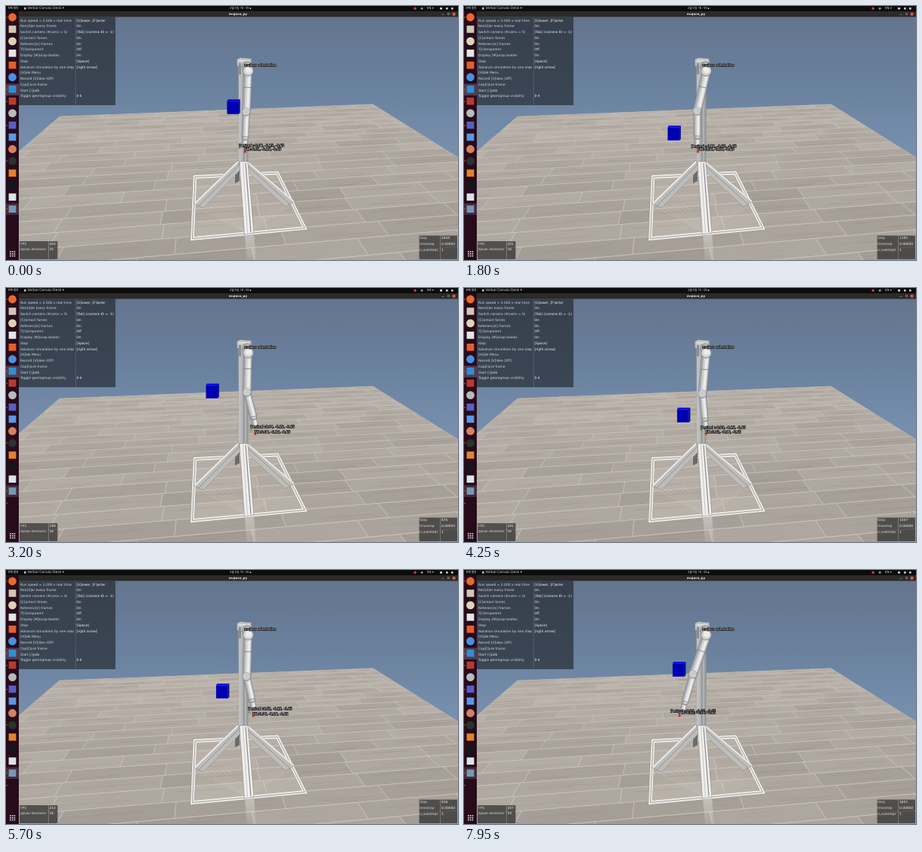
These frames come from a looping animation (600x338 px, 8000 ms). An HTML page with a canvas:

```html
<!DOCTYPE html>
<html lang="ko">
<head>
<meta charset="utf-8">
<title>mujoco_py</title>
<style>
html, body { margin: 0; width: 100%; height: 100%; overflow: hidden; background: #111; }
canvas { display: block; width: 600px; height: 338px; }
</style>
</head>
<body>
<canvas id="stage"></canvas>
<script>
const W = 600, H = 338, LOOP = 8000, STEP_RATE = 1.8;
const SANS = '"DejaVu Sans", sans-serif';
const UI = '"Noto Sans", "Noto Sans CJK KR", "Noto Sans CJK", sans-serif';
const scale = Math.max(1, window.devicePixelRatio || 1);

function prepare(canvas) {
  canvas.width = W * scale;
  canvas.height = H * scale;
  const c = canvas.getContext('2d');
  c.scale(scale, scale);
  return c;
}
const stage = document.getElementById('stage');
const ctx = prepare(stage);
const backdrop = document.createElement('canvas');
const overlay = document.createElement('canvas');

// ---------- helpers ----------
function random(seed) {
  return () => {
    seed = (seed * 1664525 + 1013904223) >>> 0;
    return seed / 4294967296;
  };
}
const mix = (a, b, p) => a + (b - a) * p;

function poly(c, pts, fill, stroke, width = 0.5) {
  c.beginPath();
  pts.forEach(([x, y], i) => i ? c.lineTo(x, y) : c.moveTo(x, y));
  c.closePath();
  if (fill) { c.fillStyle = fill; c.fill(); }
  if (stroke) { c.strokeStyle = stroke; c.lineWidth = width; c.stroke(); }
}
function line(c, a, b, color, width, cap = 'butt') {
  c.beginPath();
  c.moveTo(...a);
  c.lineTo(...b);
  c.strokeStyle = color;
  c.lineWidth = width;
  c.lineCap = cap;
  c.stroke();
}
function disc(c, x, y, r, fill) {
  c.beginPath();
  c.arc(x, y, r, 0, 7);
  c.fillStyle = fill;
  c.fill();
}
function rect(c, x, y, w, h, fill) {
  c.fillStyle = fill;
  c.fillRect(x, y, w, h);
}
function text(c, str, x, y, size = 4.5, fill = '#e4e7ea', family = SANS, align = 'left', weight = '') {
  c.font = `${weight} ${size}px ${family}`;
  c.textAlign = align;
  c.textBaseline = 'middle';
  c.fillStyle = fill;
  c.fillText(str, x, y);
}
function label(str, x, y) {
  ctx.font = `4.45px ${SANS}`;
  ctx.textAlign = 'left';
  ctx.textBaseline = 'middle';
  ctx.lineJoin = 'round';
  ctx.strokeStyle = '#0b0b0b';
  ctx.lineWidth = 1.3;
  ctx.strokeText(str, x, y);
  ctx.fillStyle = '#f2f2f2';
  ctx.fillText(str, x, y);
}
// Rows are [position, ...values] in ascending order of position.
function sample(rows, at) {
  let i = 0;
  while (i < rows.length - 2 && at > rows[i + 1][0]) i++;
  const a = rows[i], b = rows[i + 1];
  const p = Math.min(1, Math.max(0, (at - a[0]) / (b[0] - a[0])));
  return a.slice(1).map((v, j) => mix(v, b[j + 1], p));
}

// ---------- static scene ----------
// Two-point perspective: m runs along the planks, k into the depth.
function ground(m, k) {
  const w = 1 + m + k;
  return [(257 + 4150 * m + 257 * k) / w, (338 - 14 * (m + k)) / w];
}
function drawFloor(c) {
  const rnd = random(11), left = -0.1044, right = 0.1438, back = 1.29, front = -0.1;
  const rowStep = 0.07, plank = 0.04;
  poly(c, [ground(left, back), ground(right, back), ground(right, front), ground(left, front)], '#b0a89f');
  for (let k = back; k > front; k -= rowStep) {
    const near = k - rowStep;
    const depth = Math.max(0, k / back);
    for (let m = left - rnd() * plank; m < right; m += plank) {
      const a = Math.max(left, m), b = Math.min(right, m + plank);
      const tone = 161 + 18 * depth + (rnd() - 0.5) * 13;
      const seam = `rgba(216,210,202,${0.7 - 0.3 * depth})`;
      poly(c, [ground(a, k), ground(b, k), ground(b, near), ground(a, near)],
        `rgb(${tone + 7},${tone},${tone - 8})`, seam, 0.8 - 0.35 * depth);
      for (let g = 0; g < 4; g++) {
        const v = k - rowStep * (0.1 + 0.8 * rnd());
        const s = mix(a, b, rnd() * 0.5), e = mix(s, b, 0.3 + 0.7 * rnd());
        line(c, ground(s, v), ground(e, v), `rgba(100,88,78,${0.05 + 0.12 * rnd()})`, 0.6);
      }
    }
  }
}
function beam(c, pts, fill, grooveA, grooveB) {
  poly(c, pts, fill, '#85837f', 0.5);
  line(c, grooveA, grooveB, '#8d8c8a', 0.9);
}
function drawStand(c) {
  const frame = [[251, 227.5], [360, 222], [396.5, 295.5], [247.5, 309.5]];
  poly(c, frame, 'rgba(222,216,206,0.2)');
  for (let i = 0; i < 6; i++) {
    line(c, [256 + i * 7, 268 - i], [318 + i * 2, 301], 'rgba(238,232,220,0.38)', 0.6);
    line(c, [376 - i * 7, 266 + i], [324 - i * 2, 300], 'rgba(238,232,220,0.3)', 0.6);
  }
  const shine = c.createLinearGradient(0, 304, 0, 338);
  shine.addColorStop(0, 'rgba(235,232,228,0.45)');
  shine.addColorStop(1, 'rgba(235,232,228,0.1)');
  poly(c, [[317, 304], [329, 302], [332, 338], [320, 338]], shine);

  c.lineJoin = 'miter';
  poly(c, frame, null, '#8f8a83', 5.6);
  poly(c, frame, null, '#efedea', 4.8);
  poly(c, frame, null, '#99948e', 0.9);

  poly(c, [[304, 222], [310, 218], [310, 233], [304, 236]], '#6c6b69');
  beam(c, [[308, 205], [312, 217], [262, 269], [249.5, 263]], '#bdbcba', [310, 211], [256, 266]);
  line(c, [308, 207], [250.5, 263], '#ececea', 2);
  beam(c, [[320, 206], [383, 260], [371, 267], [321, 221]], '#bfbdba', [321, 213], [377, 264]);
  line(c, [321, 208], [382, 260], '#eae8e6', 2);

  const g = c.createLinearGradient(308, 0, 322, 0);
  g.addColorStop(0, '#8f9192');
  g.addColorStop(0.12, '#c3c4c5');
  g.addColorStop(0.45, '#b1b2b3');
  g.addColorStop(0.55, '#8e8f91');
  g.addColorStop(0.68, '#b4b5b6');
  g.addColorStop(1, '#87898b');
  poly(c, [[308.3, 72], [322, 72], [321.4, 208], [309, 208]], g);

  poly(c, [[310, 207], [321, 207], [329, 302], [316.5, 304]], '#f0efee', '#777572', 0.5);
  line(c, [314.5, 209], [320.5, 302], '#b3b2b0', 0.7);
  line(c, [318, 209], [325, 301], '#8b8987', 1.2);
}
function drawBackdrop(c) {
  const sky = c.createLinearGradient(0, 14, 0, 198);
  sky.addColorStop(0, '#64748e');
  sky.addColorStop(0.5, '#6a819e');
  sky.addColorStop(1, '#7890ae');
  rect(c, 0, 0, W, H, sky);
  drawFloor(c);
  drawStand(c);
}

// ---------- desktop and panels ----------
const MENU = [
  ['Run speed = 2.000 x real time', '[S]lower, [F]aster'],
  ['Ren[d]er every frame', 'On'],
  ['Switch camera (#cams = 5)', '[Tab] (camera ID = -1)'],
  ['[C]ontact forces', 'On'],
  ['Referenc[e] frames', 'On'],
  ['T[r]ansparent', 'Off'],
  ['Display [M]ocap bodies', 'On'],
  ['Stop', '[Space]'],
  ['Advance simulation by one step', '[right arrow]'],
  ['[H]ide Menu', ''],
  ['Record [V]ideo (Off)', ''],
  ['Cap[t]ure frame', ''],
  ['Start [i]pdb', ''],
  ['Toggle geomgroup visibility', '0-4']
];
// Shape (c = circle, s = square) and colour of each dock entry.
const DOCK = 'c#e8692c s#d2c6b4 c#e0d2b6 s#e3e5e6 s#e2602b c#4a8fe0 s#2f8fd4 s#b63c31 c#b9babb ' +
  's#5660c4 s#5a97e6 c#d58062 c#29332f s#e5822b s#16161a s#dce4e9 s#7797b5';

function drawDock(c) {
  rect(c, 0, 7, 17, H - 7, '#260b1b');
  rect(c, 0, 103.5, 17, 15.5, '#55394b');
  rect(c, 0, 262.5, 17, 15.5, '#432b3b');
  DOCK.split(' ').forEach((entry, i) => {
    const y = 15 + i * 15.95, color = entry.slice(1);
    if (entry[0] === 'c') disc(c, 8.5, y, 5.4, color);
    else rect(c, 3.6, y - 4.8, 9.8, 9.6, color);
  });
  for (const y of [15, 111, 127, 159, 206, 270]) disc(c, 1.2, y, 0.8, '#e95420');
  for (let i = 0; i < 9; i++) rect(c, 5 + (i % 3) * 2.8, 326.2 + Math.floor(i / 3) * 2.8, 1.6, 1.6, '#eee');
}
function drawBars(c) {
  rect(c, 0, 0, W, 7, '#0c0c0c');
  rect(c, 17, 7, W - 17, 7.5, '#2b2a29');
  text(c, '현재 활동', 2.5, 3.3, 3.6, '#ddd', UI);
  rect(c, 24, 1.8, 2.6, 2.8, '#bbb');
  text(c, 'Verbal Canvas Desk ▾', 28.5, 3.3, 4.5, '#d8d8d8', SANS);
  disc(c, 324.5, 3.2, 0.9, '#ddd');
  disc(c, 543, 3.3, 1.7, '#c7453c');
  disc(c, 552, 3.3, 1.5, '#7f93c8');
  text(c, 'EN ▾', 559, 3.3, 4, '#ddd', SANS);
  rect(c, 576, 2, 3, 2.6, '#ccc');
  rect(c, 584, 2, 2.6, 2.6, '#ccc');
  rect(c, 591, 2, 2.6, 2.6, '#ccc');
  text(c, 'mujoco_py', 308, 10.6, 4.1, '#e6e6e6', SANS, 'center', 'bold');
  line(c, [578.5, 11.4], [581.5, 11.4], '#aaa', 0.6);
  c.strokeStyle = '#aaa';
  c.lineWidth = 0.5;
  c.strokeRect(586.3, 9.6, 2.2, 2.2);
  disc(c, 594.6, 10.7, 2.2, '#e2572b');
}
function drawOverlay(c) {
  drawDock(c);
  drawBars(c);
  rect(c, 17, 14.5, 75.6, 117.5, 'rgba(25,29,34,0.6)');
  rect(c, 93, 14.5, 52.3, 117.5, 'rgba(25,29,34,0.6)');
  MENU.forEach(([name, value], i) => {
    const y = 19.6 + i * 7.73;
    text(c, name, 19, y, 4.45, '#d3d8dd');
    text(c, value, 93.4, y, 4.45, '#f3f5f6');
  });
  const shade = 'rgba(20,22,24,0.6)';
  rect(c, 18, 313, 38.5, 24, shade);
  rect(c, 57, 313, 11.5, 24, shade);
  rect(c, 548.5, 305.5, 27.5, 31.5, shade);
  rect(c, 576.5, 305.5, 22.5, 31.5, shade);
  text(c, 'FPS', 19, 316.8, 4.45, '#d3d5d7');
  text(c, 'Solver iterations', 19, 324.3, 4.2, '#d3d5d7');
  ['Step', 'timestep', 'n_substeps'].forEach((s, i) => text(c, s, 549, 309.2 + i * 7.6, 4.4, '#d3d5d7'));
  text(c, '0.00050', 578, 316.8, 4.4, '#f3f3f3');
  text(c, '1', 578, 324.4, 4.4, '#f3f3f3');
}

// ---------- motion ----------
// Each run: start time, then the place of the box.
const RUNS = [
  [-1133.3, 302, 134], [60, 288, 150], [1138.3, 279, 169], [1926, 296, 158], [2713.9, 274, 137],
  [3668.3, 291.5, 169], [4430, 282, 140], [5191.1, 287.5, 161], [5966.6, 280, 158], [7032.8, 285.5, 132]
];
// Step, wanted x in metres, elbow x and y, wrist x and y.
const POSES = [
  [0, -0.06, 318, 141, 317, 184],
  [875, 0.04, 320, 139, 331, 182],
  [916, 0.02, 319.5, 142, 328.5, 182],
  [1047, -0.03, 316.5, 141, 320.5, 184],
  [1191, -0.11, 309.5, 140, 309.5, 184],
  [1651, -0.29, 304, 139, 290, 187],
  [1770, -0.26, 298.5, 138, 291.5, 184],
  [2040, -0.06, 319, 141, 317, 185],
  [2300, -0.03, 319, 141, 320, 184]
];
// Time, frames per second, solver iterations.
const STATS = [
  [0, 203, 25], [1800, 201, 16], [3200, 199, 16], [4250, 191, 16],
  [5700, 213, 16], [6950, 197, 21], [7950, 207, 33]
];

function drawBox(x, y) {
  const l = x - 8.6, r = x + 7.2;
  poly(ctx, [[l, y - 7.5], [l + 1.2, y - 9.8], [r + 1.6, y - 9.8], [r, y - 7.5]], '#0404e6');
  rect(ctx, l, y - 7.5, r - l, 17.3, '#0000b2');
  poly(ctx, [[r, y - 7.5], [r + 1.6, y - 9.8], [r + 1.6, y + 8], [r, y + 9.8]], '#000090');
}
function tube(a, b, width) {
  const dx = b[0] - a[0], dy = b[1] - a[1], len = Math.hypot(dx, dy) || 1;
  const shift = (p, d) => [p[0] + dy / len * d, p[1] - dx / len * d];
  const layers = [['#77797b', 0, width], ['#a6a8a9', 0, width - 1], ['#d0d1d2', width * 0.08, width * 0.62],
    ['#ececec', width * 0.14, width * 0.28]];
  for (const [color, off, w] of layers) line(ctx, shift(a, off), shift(b, off), color, w, 'round');
}
function ring(a, b, p, width) {
  const x = mix(a[0], b[0], p), y = mix(a[1], b[1], p);
  const len = Math.hypot(b[0] - a[0], b[1] - a[1]);
  const nx = (b[1] - a[1]) / len * width / 2, ny = -(b[0] - a[0]) / len * width / 2;
  line(ctx, [x - nx, y - ny], [x + nx, y + ny], '#808284', 0.9);
}
function drawArm(elbow, wrist) {
  const shoulder = [321, 90];
  poly(ctx, [[306.5, 71], [311, 68.8], [325.5, 70], [326, 79], [321, 83], [307, 80]], '#c3c4c5', '#818385', 0.6);
  line(ctx, [309, 73], [323, 73], '#e6e6e6', 1.5);
  rect(ctx, 309, 76, 3, 15, '#8a8c8e');
  tube([320, 80], [321.5, 88], 13);
  tube(shoulder, elbow, 11.5);
  ring(shoulder, elbow, 0.36, 11);
  const low = [mix(elbow[0], wrist[0], 0.75), mix(elbow[1], wrist[1], 0.75)];
  tube(low, wrist, 7.5);
  tube(elbow, low, 9.8);
  ring(elbow, low, 1, 9);
  disc(ctx, elbow[0], elbow[1], 5.8, '#8d8f91');
  disc(ctx, elbow[0] - 0.2, elbow[1] - 0.4, 5, '#cbcccd');
  disc(ctx, 321.5, 86.5, 7.2, '#85878a');
  disc(ctx, 321.5, 86.2, 6.4, '#d2d3d4');
  disc(ctx, 322, 85.6, 4, '#ececec');
}
function drawTargets(x) {
  const wantX = 318.5 + 153 * x, tipX = 325.5 + 136 * x;
  const reached = (tipX - 319) / 150;
  disc(ctx, wantX + 1, 189, 1.3, '#5f9c35');
  line(ctx, [tipX - 1, 189], [tipX, 193], '#7b7d80', 1.6, 'round');
  disc(ctx, tipX, 194, 1.8, '#e0301c');
  label('mujoco orientation', 316.5, 79.3);
  label(`Desired :${x.toFixed(2)}, -0.15, -0.65`, wantX, 185.5 - 9 * x);
  label(`FK :${reached.toFixed(2)}, -0.16, -0.65`, tipX - 0.5, 191.6 + 5 * x);
}
function drawReadouts(t, step) {
  const [fps, iterations] = sample(STATS, t);
  const bright = '#f3f3f3';
  text(ctx, String(Math.round(fps)), 57.5, 316.8, 4.4, bright);
  text(ctx, String(Math.round(iterations)), 57.5, 324.3, 4.4, bright);
  text(ctx, String(Math.round(step)), 578, 309.2, 4.4, bright);
  text(ctx, `2월 5일 ${t < 3700 ? '18 : 59' : '19 : 00'}`, 297, 3.3, 3.9, '#e2e2e2', UI);
  if (t >= 2550) disc(ctx, 1.2, 286.5, 0.8, '#e95420');
}
function render(t) {
  const run = RUNS.filter(r => r[0] <= t).pop();
  const step = (t - run[0]) * STEP_RATE;
  const [x, elbowX, elbowY, wristX, wristY] = sample(POSES, step);
  ctx.drawImage(backdrop, 0, 0, W, H);
  drawBox(run[1], run[2]);
  drawArm([elbowX, elbowY], [wristX, wristY]);
  drawTargets(x);
  ctx.drawImage(overlay, 0, 0, W, H);
  drawReadouts(t, step);
}

drawBackdrop(prepare(backdrop));
drawOverlay(prepare(overlay));
const began = performance.now();
function tick() {
  const t = (performance.now() - began) % LOOP;
  render(Math.floor(t / 50) * 50);
  requestAnimationFrame(tick);
}
tick();
</script>
</body>
</html>
```
